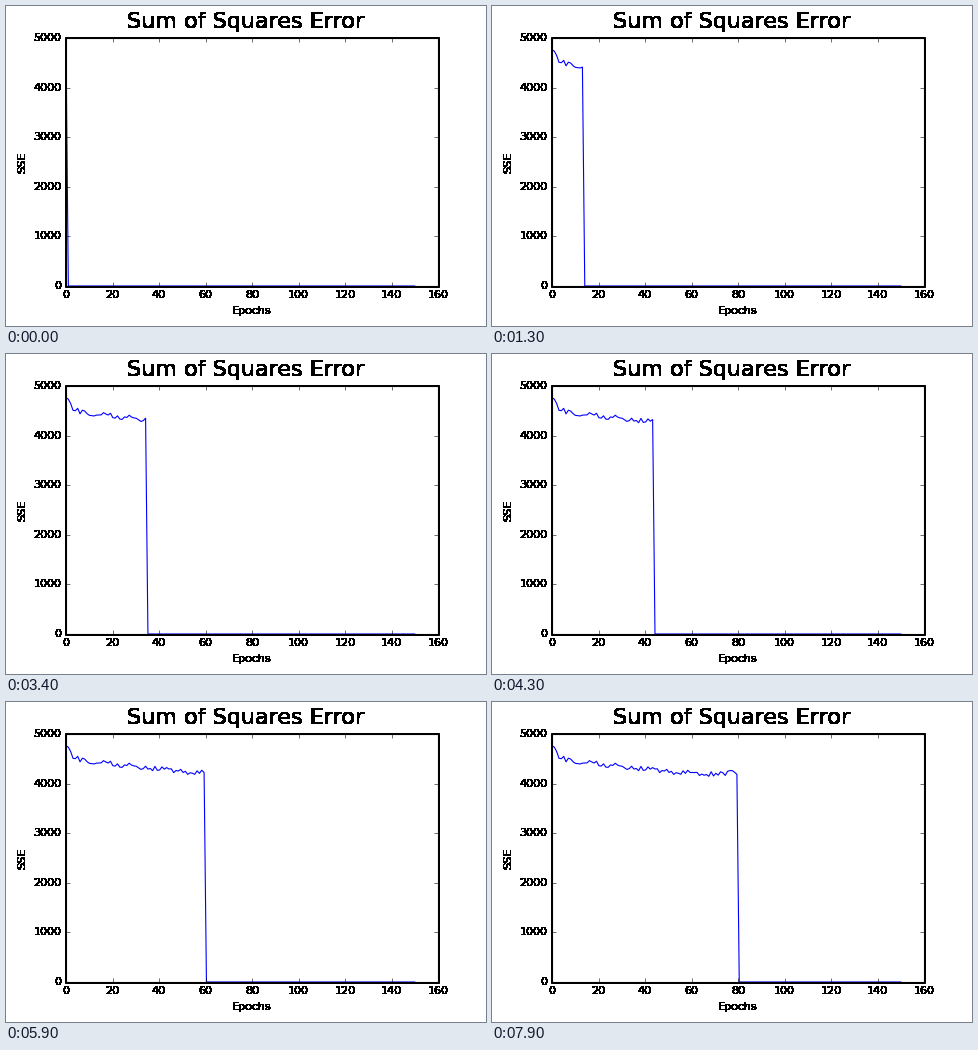
Recreate the animation shown at these times as a matplotlib script. Size 480 by 320 pixels, loop 8 s.

```python
import matplotlib.pyplot as plt
import numpy as np
from matplotlib.animation import FuncAnimation
from matplotlib.patches import Rectangle

W, H, DPI = 480, 320, 80
FRAMES, STEP_MS = 80, 100
EPOCHS = 150

plt.style.use("classic")
plt.rcParams.update({"font.family": "DejaVu Sans", "font.size": 10})


def harden(img, dpi):
    """Turn every touched pixel solid black, for jagged heavy text."""
    out = np.zeros_like(img)
    out[..., 3] = img[..., 3] > 0
    return out, 0, 0


def training_errors(count):
    """Steep early fall, then a slow noisy decline."""
    rng = np.random.default_rng(7)
    epoch = np.arange(count)
    trend = np.interp(epoch, [0, 3, 10, 25, 43, 50, 69, 79],
                      [4765, 4540, 4430, 4375, 4285, 4240, 4185, 4225])
    noise = rng.uniform(-55, 55, count)
    noise[0] = 0
    return trend + noise


fig = plt.figure(figsize=(W / DPI, H / DPI), dpi=DPI, facecolor="white")
ax = fig.add_axes([0.125, 0.125, 0.775, 0.775])
ax.set_xlim(0, 160)
ax.set_ylim(0, 5000)
ax.set_xticks(range(0, 161, 20))
ax.set_yticks(range(0, 5001, 1000))

texts = [
    fig.suptitle("Sum of Squares Error", fontsize=20),
    ax.set_xlabel("Epochs"),
    ax.set_ylabel("SSE", labelpad=6),
    *ax.get_xticklabels(),
    *ax.get_yticklabels(),
]
for text in texts:
    text.set_agg_filter(harden)

# one solid pixel just outside the axes frame
fig.add_artist(Rectangle((59.5, H - 281.5), 374, 250, transform=None,
                         fill=False, edgecolor="black",
                         linewidth=72 / DPI, snap=False))

# points are spread over the full range, slightly more than one unit apart
x = np.linspace(0, EPOCHS, EPOCHS)
errors = np.zeros(EPOCHS)
errors[:FRAMES] = training_errors(FRAMES)
line, = ax.plot(x, np.zeros(EPOCHS), color="blue", linewidth=1)


def update(epoch):
    line.set_ydata(np.where(np.arange(EPOCHS) <= epoch, errors, 0))
    return line,


anim = FuncAnimation(fig, update, frames=FRAMES, interval=STEP_MS,
                     repeat=True, repeat_delay=0, blit=False)
plt.show()
```
